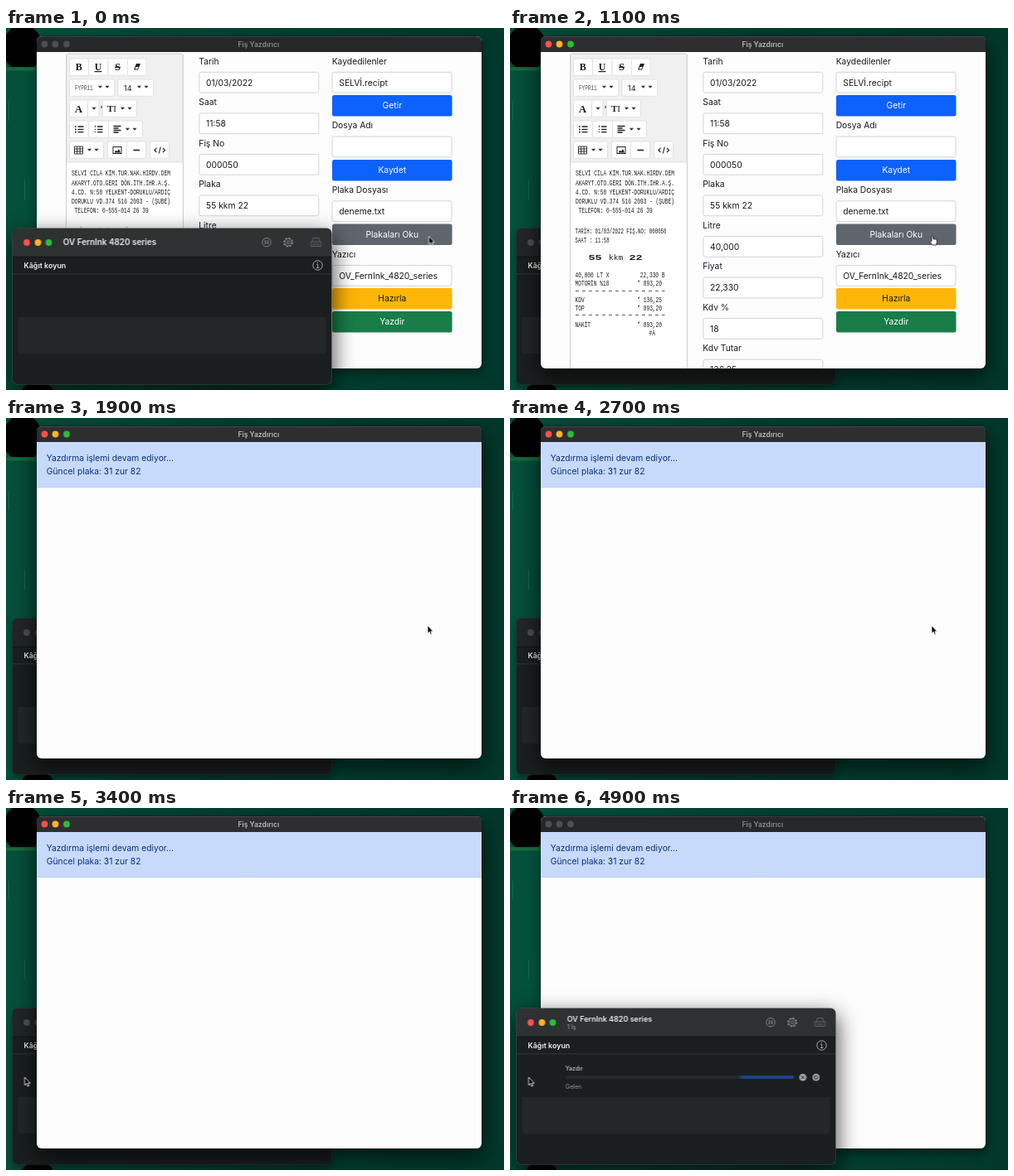
An HTML page that plays this animation: 600x437 px, repeating every 5 s.

```html
<!DOCTYPE html>
<html lang="tr">
<head>
<meta charset="utf-8">
<title>Fiş Yazdırıcı</title>
<style>
html, body { margin: 0; width: 100%; height: 100%; overflow: hidden; background: #03382b; }
#stage { position: relative; width: 600px; height: 437px; overflow: hidden; }
svg { position: absolute; left: 0; top: 0; width: 100%; height: 100%; font-family: Inter, "Open Sans", sans-serif; }
.win { position: absolute; border-radius: 6px; }
.win svg { border-radius: 6px; }
#main { left: 37px; top: 10px; width: 536px; height: 401px; }
#printer { left: 8px; top: 242px; width: 384px; height: 188px; z-index: 2; }
#pointer { z-index: 5; }

#main, #printer, .mf, .pf, .page, .alert, .job, .nojob, .press, .arrow, .hand { animation: 5s step-end infinite; }
#main { animation-name: raise; }
#printer { animation-name: lower; }
.mf { animation-name: main-on; }
.pf { animation-name: printer-on; }
.page { animation-name: page; }
.alert { animation-name: alert; }
.job { animation-name: job; }
.nojob { animation-name: nojob; }
.press { animation-name: press; }
.arrow { animation-name: arrow; }
.hand { animation-name: hand; }
.bar { animation: slide 5s linear infinite; }
#pointer g.move { animation: move 5s step-end infinite; }

@keyframes raise {
  0%, 70% { z-index: 1; box-shadow: 0 0 0 .5px #0008, 0 5px 12px #0007; }
  8% { z-index: 3; box-shadow: 0 0 0 .5px #0009, 0 10px 26px 2px #0009; }
}
@keyframes lower {
  0%, 70% { box-shadow: 0 0 0 .6px #4b4e4f, 0 10px 26px 3px #000a; }
  8% { box-shadow: 0 0 0 .6px #303434, 0 5px 10px #0006; }
}
@keyframes main-on { 0%, 70% { opacity: 0; } 8% { opacity: 1; } }
@keyframes printer-on { 0%, 70% { opacity: 1; } 8% { opacity: 0; } }
@keyframes page { 0% { opacity: 1; } 38%, 100% { opacity: 0; } }
@keyframes alert { 0% { opacity: 0; } 38%, 100% { opacity: 1; } }
@keyframes job { 0% { opacity: 0; } 84%, 100% { opacity: 1; } }
@keyframes nojob { 0% { opacity: 1; } 84%, 100% { opacity: 0; } }
@keyframes press { 0% { fill: #5e656c; stroke: #5e656c; stroke-width: 0; } 34%, 100% { fill: #4c5258; stroke: #7d848a; stroke-width: .8; } }
@keyframes arrow { 0%, 38%, 100% { opacity: 1; } 20% { opacity: 0; } }
@keyframes hand { 0%, 38%, 100% { opacity: 0; } 20% { opacity: 1; } }
@keyframes slide { 0%, 84% { transform: translateX(-92px); } 98% { transform: translateX(210px); } 100% { transform: translateX(253px); } }
@keyframes move {
  0% { transform: translate(509.5px, 251.5px); }
  20% { transform: translate(508px, 250.5px); }
  54% { transform: translate(508px, 250.5px); animation-timing-function: ease-in-out; }
  64%, 100% { transform: translate(22.5px, 325px); }
}

.form, .alert { font-size: 10.3px; fill: #17191c; }
.alert text { fill: #0a2f7c; }
.field { fill: #fff; stroke: #ced4da; }
.mid { text-anchor: middle; }
.cap { font-size: 8.6px; font-weight: 600; }
.btn { fill: #fff; stroke: #dcdcdc; stroke-width: .8; }
.ink { fill: none; stroke: #222; }
.tools text { font-family: "Liberation Serif", serif; font-weight: 700; font-size: 12px; fill: #1c1c1c; }
.tools .mono { font: 8.6px "Liberation Mono", monospace; fill: #555; }
.tools .sans { font: 9px Inter, sans-serif; }
.slip { font: 9.3px "Liberation Mono", monospace; fill: #1c1c1c; }
.slip .sm { font-size: 8.6px; }
.slip .wide { font-size: 9px; font-weight: 700; }
.slip .plate { font-size: 9.6px; }
.end { text-anchor: end; }
.dash { stroke: #333; stroke-width: .8; stroke-dasharray: 3.8 4.2; }
.icon { fill: none; stroke: #8f9293; stroke-width: .9; }
</style>
</head>
<body>
<div id="stage">
  <svg viewBox="0 0 600 437">
    <defs>
      <linearGradient id="wall">
        <stop offset="0" stop-color="#04503b"/><stop offset=".5" stop-color="#034032"/><stop offset="1" stop-color="#02382b"/>
      </linearGradient>
      <clipPath id="dome"><path d="M0 0H60V47H0Z"/></clipPath>
      <clipPath id="track"><rect x="67" y="323" width="276" height="4" rx="2"/></clipPath>
    </defs>
    <path fill="url(#wall)" d="M0 0H600V437H0Z"/>
    <path fill="#17693a" d="M0 47.5H38V51.5H0Z"/>
    <ellipse cx="20" cy="24" rx="24" ry="28" clip-path="url(#dome)"/>
    <path d="M3.5 88V112M22.5 183V207" stroke="#1b6b50" stroke-width=".8"/>
    <ellipse cx="38" cy="438" rx="18.5" ry="10"/>
  </svg>

  <div id="main" class="win">
    <svg viewBox="37.5 10 536 401">
      <path fill="#fdfdfe" d="M37 10H574V412H37Z"/>
      <path fill="#252728" d="M37 10H574V29H37Z"/>
      <g class="lights" data-at="47,60,73.5" data-y="19.5" data-idle="#4c4e50"></g>
      <text class="cap mid" x="304.8" y="22.5" fill="#88898a">Fiş Yazdırıcı</text>
      <g class="mf">
        <path fill="#2e2e30" d="M37 10H574V29H37Z"/>
        <g class="lights" data-at="47,60,73.5" data-y="19.5"></g>
        <text class="cap mid" x="304.8" y="22.5" fill="#b9b9ba">Fiş Yazdırıcı</text>
      </g>
      <path d="M38 10.4H573" stroke="#fff" stroke-opacity=".2" stroke-width=".7"/>

      <g class="page">
        <rect x="73" y="31" width="141" height="400" rx="2" fill="#fff" stroke="#cfcfcf"/>
        <path fill="#f0f0f0" stroke="#d8d8d8" stroke-width=".8" d="M73.5 31.5H213.5V162H73.5Z"/>
        <g class="tools">
          <g id="buttons"></g>
          <text class="mid" x="88.3" y="51">B</text>
          <text class="mid" x="111.5" y="51" text-decoration="underline">U</text>
          <text class="mid" x="135" y="51" text-decoration="line-through">S</text>
          <path fill="#222" d="M154.5 50.5L157.5 43H162.5L159.5 50.5Z"/>
          <path fill="#fff" d="M156 49.5L157 47H160L159 49.5Z"/>
          <g transform="translate(83.5 75) scale(.7 1)"><text class="mono">FYPR11</text></g>
          <text class="sans" x="142.5" y="75.5">14</text>
          <text class="mid" x="88" y="101.5" style="font-size:13px">A</text>
          <path class="ink" d="M115.5 94V97"/>
          <text x="122.5" y="101" style="font-size:11px">T<tspan style="font-weight:400">I</tspan></text>
          <path class="ink" stroke-width="1.3" d="M87 119H94M87 122.3H94M87 125.6H94M110.5 119H117M110.5 122.3H117M110.5 125.6H117M130 118.5H139M130 121H136M130 123.5H139M130 126H136"/>
          <path class="ink" stroke-width="1.6" d="M83.5 119H85.2M83.5 122.3H85.2M83.5 125.6H85.2"/>
          <path class="ink" stroke-width=".8" d="M108 117.5V120M107 122.3H109M107 125.5H109"/>
          <path class="ink" stroke-width=".9" d="M83 143H93V152H83ZM83 146H93M83 149H93M86.3 143V152M89.6 143V152"/>
          <rect class="ink" x="129.5" y="143.5" width="10" height="8"/>
          <path fill="#222" d="M131 150.5L133 147.5 134.5 149 136.5 146 138.5 150.5Z"/>
          <path class="ink" stroke-width="1.6" d="M154 147.5H161.5"/>
          <path class="ink" stroke-width="1.1" d="M182 145L179.3 147.5 182 150M189.5 145L192.2 147.5 189.5 150M186.8 143.7L184.8 151.3"/>
          <g id="carets" fill="#333"></g>
        </g>
        <g id="slip" class="slip"></g>
        <g id="form" class="form"></g>
      </g>

      <g class="alert">
        <path fill="#c7dafc" d="M37 29H574V83.5H37Z"/>
        <path stroke="#aecbf8" stroke-width=".8" d="M37 83.5H574"/>
        <text x="49.3" y="52.2">Yazdırma işlemi devam ediyor...</text>
        <text x="49.3" y="68.3">Güncel plaka: 31 zur 82</text>
      </g>
    </svg>
  </div>

  <div id="printer" class="win">
    <svg viewBox="8.5 242 384 188">
      <path fill="#1a1e1e" d="M8 242H393V430H8Z"/>
      <path fill="#222526" d="M8 242H393V276H8Z"/>
      <g class="lights" data-at="25.5,39,52" data-y="259" data-idle="#4c4f50"></g>
      <g class="pf">
        <path fill="#2e3132" d="M8 242H393V276H8Z"/>
        <g class="lights" data-at="25.5,39,52" data-y="259"></g>
        <g class="nojob"><text x="69.3" y="262.3" font-size="9.9" font-weight="600" fill="#eceded">OV FernInk 4820 series</text></g>
        <g class="job">
          <text x="69.3" y="257.8" font-size="9" font-weight="600" fill="#eceded">OV FernInk 4820 series</text>
          <text x="69.3" y="267.3" font-size="7.2" fill="#a4a7a8">1 İş</text>
        </g>
        <g class="icon">
          <circle cx="314.5" cy="258.7" r="5.2"/>
          <path stroke-width="1.2" d="M313 256.3V261.1M316.1 256.3V261.1"/>
          <circle cx="340.5" cy="258.7" r="4.3"/><circle cx="340.5" cy="258.7" r="1.8"/>
          <circle cx="340.5" cy="258.7" r="5.2" stroke-width="1.5" stroke-dasharray="1.8 2.284"/>
          <path stroke="#66696a" d="M369.5 258L371 253.5H377.5L378.5 258M368 258H380V263.5H368ZM370 261H378"/>
        </g>
      </g>
      <path stroke="#111414" d="M8 276.3H393"/>
      <path stroke="#343838" stroke-width=".9" d="M8 296.8H393"/>
      <text x="22" y="290.2" font-size="8.9" font-weight="600" fill="#f0f1f1">Kâğıt koyun</text>
      <g class="icon" style="stroke:#b4b6b6"><circle cx="376" cy="286.5" r="5.7"/><path d="M374.8 285.3H376.2V289.3M374.5 289.5H377.8M375.9 282.6V283.8"/></g>
      <rect x="15" y="348.7" width="371" height="44.5" rx="2.5" fill="#232727"/>
      <g class="job">
        <text x="67.3" y="317.3" font-size="7.1" fill="#e2e4e4">Yazdır</text>
        <g clip-path="url(#track)">
          <path fill="#242929" d="M67 323H343V327H67Z"/>
          <rect class="bar" x="67" y="323" width="92" height="4" rx="2" fill="#1d4385"/>
        </g>
        <text x="67.3" y="338.5" font-size="7.2" fill="#929595">Gelen</text>
        <circle cx="353.3" cy="325.2" r="4.4" fill="#a2a5a5"/><circle cx="369.3" cy="325.2" r="4.4" fill="#a2a5a5"/>
        <path fill="none" stroke="#1a1e1e" d="M351.7 323.6L354.9 326.8M354.9 323.6L351.7 326.8M371.1 324.6A2 2 0 1 1 369.3 323.2L370.6 323.4"/>
      </g>
    </svg>
  </div>

  <svg id="pointer" viewBox="0 0 600 437">
    <g class="move">
      <path class="arrow" stroke="#fff" stroke-width=".8" d="M0 0V9.6L2.2 7.6 3.7 11 5.3 10.3 3.8 7.1H6.7Z"/>
      <path class="hand" fill="#fff" stroke="#111" stroke-width=".8" d="M0 6.6V.9Q.9-.4 1.8 .9V4.1L4.3 4.5 6.4 5.2V8.2L5.4 11.4H.9L-2.3 7.6Q-2.1 5.8 0 7.3Z"/>
    </g>
  </svg>
</div>

<script>
const fill = (id, parts) => document.getElementById(id).innerHTML = parts.join("");
const text = (x, y, s, cls = "") => `<text x="${x}" y="${y}" class="${cls}">${s}</text>`;
const rect = (x, y, w, h, r, attrs) => `<rect x="${x}" y="${y}" width="${w}" height="${h}" rx="${r}" ${attrs}/>`;

// Title bar lights
for (const g of document.querySelectorAll(".lights")) {
  const { at, y, idle } = g.dataset;
  g.innerHTML = at.split(",").map((x, i) =>
    `<circle cx="${x}" cy="${y}" r="3.9" fill="${idle || ["#fe5148", "#fdb424", "#27bf38"][i]}"/>`).join("");
}

// Toolbar: row top, then left edge and width of each button
const rows = [
  [37, 77, 23, 100, 23.5, 123.5, 23.5, 147, 22.5],
  [62, 77, 54, 135.5, 42.5],
  [87, 77, 22, 99, 13.5, 117, 41],
  [112, 77, 23, 100, 24, 124, 41],
  [137, 77, 41, 123, 23, 146, 23, 174, 23]
];
fill("buttons", rows.flatMap(([y, ...b]) =>
  b.flatMap((x, i) => i % 2 ? [] : rect(x, y, b[i + 1], 20.3, 1.5, 'class="btn"'))));
const carets = [[114, 71], [122.5, 71], [161, 71], [169.5, 71], [106.5, 97], [141, 97], [149.5, 97], [147, 122], [155.5, 122], [101, 147], [109.5, 147]];
fill("carets", carets.map(([x, y]) => `<path d="M${x - 2.6} ${y - 1.2}h5.2l-2.6 3z"/>`));

// Receipt, set in a condensed typewriter face
const scaled = (k, x, y, s, cls) => `<g transform="translate(${x} ${y}) scale(${k} 1)">${text(0, 0, s, cls)}</g>`;
const slim = (x, y, s, cls) => scaled(.667, x, y, s, cls);
const head = [
  "SELVİ CİLA KİM.TUR.NAK.HIRDV.DEM",
  "AKARYT.OTO.GERİ DÖN.İTH.İHR.A.Ş.",
  "4.CD. N:58 YELKENT-DORUKLU/ARDIÇ",
  "DORUKLU VD.374 516 2093 - (ŞUBE)"
];
const sums = [["40,000 LT X", "22,330 B", 301, 187], ["MOTORİN %18", "* 893,20", 310.5, 183.5],
  ["KDV", "* 136,25", 330.8, 183.5], ["TOP", "* 893,20", 340.5, 183.5], ["NAKİT", "* 893,20", 360.5, 183.5]];
const wide = (x, s) => scaled(1.5, x, 280.3, s, "wide");
fill("slip", [
  ...head.map((s, i) => slim(79.5, 178.3 + i * 11.2, s)),
  slim(83, 223, "TELEFON: 0-555-014 26 39"),
  slim(79, 247.5, "TARİH: 01/03/2022 FİŞ.NO: 000050", "sm"),
  slim(79, 258.5, "SAAT : 11:58", "sm"),
  wide(95, "55"), text(119.5, 280.3, "kkm", "plate"), wide(144, "22"),
  ...sums.flatMap(([a, b, y, x]) => [slim(79, y, a), slim(x, y, b, "end")]),
  '<path class="dash" d="M79.5 317.5H187M79.5 346.5H187"/>',
  slim(168, 370.5, "#A")
]);

// Form columns
const field = (x, y, s) => rect(x + .5, y, 144, 24.8, 2.5, 'class="field"') + text(x + 8.8, y + 16.3, s);
const button = (y, s, color, ink = "#fff", cls = "") =>
  rect(393.5, y, 144.5, 25.5, 2.5, `fill="${color}" class="${cls}"`) +
  `<text class="mid" x="465.8" y="${y + 16.4}" style="fill:${ink}">${s}</text>`;
const left = [["Tarih", "01/03/2022"], ["Saat", "11:58"], ["Fiş No", "000050"], ["Plaka", "55 kkm 22"],
  ["Litre", "40,000"], ["Fiyat", "22,330"], ["Kdv %", "18"], ["Kdv Tutar", "136,25"]];
fill("form", [
  ...left.map(([label, value], i) => {
    const y = 43.6 + i * 49.55;
    return text(232.8, y, label) + field(232.8, y + 9.7, value);
  }),
  text(393.2, 43.6, "Kaydedilenler"), field(393, 53.3, "SELVİ.recipt"), button(81, "Getir", "#0d61fd"),
  text(393.2, 121.3, "Dosya Adı"), field(393, 131, ""), button(159, "Kaydet", "#0d61fd"),
  text(393.2, 199.1, "Plaka Dosyası"), field(393, 208.8, "deneme.txt"), button(236.5, "Plakaları Oku", "#5e656c", "#fff", "press"),
  text(393.2, 276.8, "Yazıcı"), field(393, 286.5, "OV_FernInk_4820_series"),
  button(314, "Hazırla", "#fdb508", "#17191c"), button(342, "Yazdir", "#187d48")
]);
</script>
</body>
</html>
```
